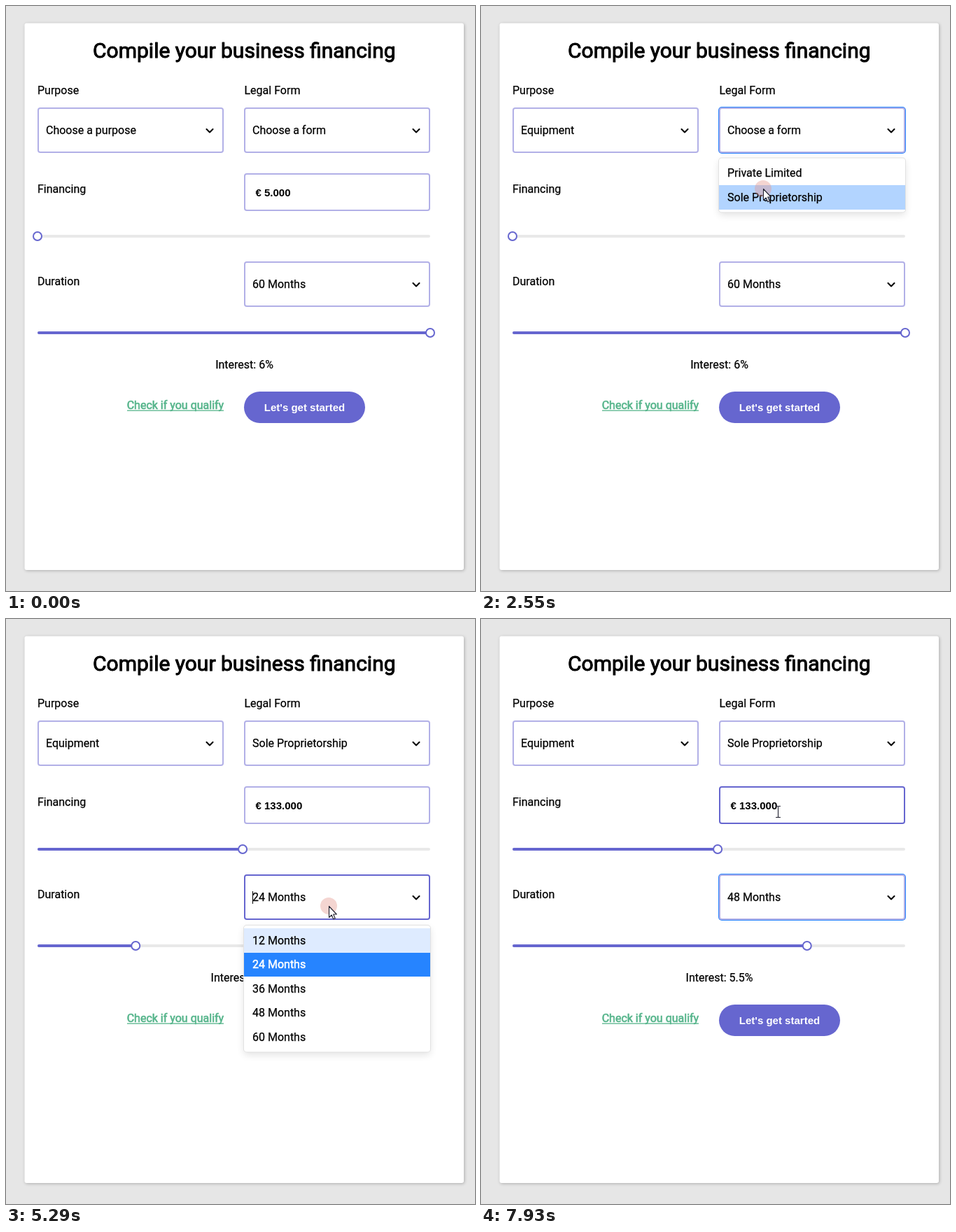
Recreate the animation shown at these times as an HTML page with a canvas. Size 670 by 836 pixels, loop 7.99 s.

```html
<!DOCTYPE html>
<html lang="en">
<head>
<meta charset="utf-8">
<title>Business financing form</title>
<style>
html, body { margin: 0; width: 100%; height: 100%; overflow: hidden; background: #e6e6e6; }
canvas { display: block; }
</style>
</head>
<body>
<canvas id="stage" width="670" height="836"></canvas>
<script>
const ctx = document.getElementById('stage').getContext('2d');
const LOOP = 7990;
const SANS = 'Roboto, sans-serif';
const ARIAL = '"Liberation Sans", Arial, sans-serif';
const VIOLET = '#6666cf', LIGHT = '#b2b0e7', BLUE = '#2684ff';
const TRACK = { x: 45, w: 561 };
const ROW = 34.5;

const purpose = { x: 45, y: 145, w: 266, h: 65, options: ['Marketing', 'Equipment'], open: [1050, 1600], focus: [1050, 1890] };
const legal = { x: 340, y: 145, w: 266, h: 65, options: ['Private Limited', 'Sole Proprietorship'], open: [1890, 2680], focus: [1890, 3400] };
const duration = { x: 340, y: 365, w: 266, h: 65, options: [12, 24, 36, 48, 60].map(m => m + ' Months'), open: [5220, 6140], focus: [5345, LOOP] };
const selects = [purpose, legal, duration];
const amount = { x: 340, y: 239, w: 266, h: 54 };
const button = { x: 340, y: 551, w: 173, h: 45 };

// Pointer path: time, x, y
const path = [
  [260, 562, 775], [620, 330, 440], [950, 160, 185], [1130, 158, 187], [1320, 160, 221],
  [1480, 165, 268], [1610, 165, 270], [1830, 395, 190], [1960, 398, 190], [2280, 404, 236],
  [2500, 403, 261], [2690, 403, 261], [2950, 190, 310], [3200, 9, 337], [3370, 45, 333],
  [3460, 98, 333], [3660, 338, 333], [3860, 338, 333], [4060, 614, 464], [4130, 624, 466],
  [4300, 606, 466], [4500, 606, 466], [4780, 185, 467], [4860, 185, 467], [5150, 461, 407],
  [5220, 461, 410], [5350, 461, 410], [5780, 440, 590], [5980, 435, 566], [6140, 435, 566],
  [6400, 412, 598], [6600, 412, 598], [6670, 393, 593], [6690, 393, 593], [6870, 420, 748],
  [7110, 420, 748], [7330, 333, 560], [7460, 352, 430], [7650, 429, 273], [7780, 429, 273], [7920, 424, 275]
];
const presses = [[1010, 1130], [1540, 1640], [1850, 1960], [2500, 2690], [3380, 3860], [4490, 4860], [5200, 5350], [6030, 6150]];

const within = (t, [a, b]) => t >= a && t < b;
const inside = (p, r) => p.x >= r.x && p.x < r.x + r.w && p.y >= r.y && p.y < r.y + r.h;

function pointerAt(t) {
  const i = path.findIndex(k => k[0] > t);
  if (i < 0) return { x: path.at(-1)[1], y: path.at(-1)[2] };
  if (i === 0) return { x: -99, y: -99 };
  const [t0, x0, y0] = path[i - 1], [t1, x1, y1] = path[i];
  const u = (t - t0) / (t1 - t0), e = u * u * (3 - 2 * u);
  return { x: x0 + (x1 - x0) * e, y: y0 + (y1 - y0) * e };
}

const trackShare = t => Math.min(1, Math.max(0, (pointerAt(t).x - TRACK.x) / TRACK.w));

function stateAt(t) {
  const thousands = t < 3370 ? 5 : 5 + Math.round(245 * trackShare(Math.min(t, 3660)));
  let months = 60;
  if (t >= 6140) months = 48;
  else if (t >= 4500) months = 12 + 12 * Math.round(4 * trackShare(Math.min(t, 4780)));
  const rate = (thousands < 100 ? 6 : 5) + (60 - months) / 24;
  return { thousands, months, rate };
}

function text(str, x, y, { size = 16, color = '#000', family = SANS, weight = 400, extra = 0.25, align = 'left' } = {}) {
  ctx.font = `${weight} ${size}px ${family}`;
  ctx.textAlign = align;
  ctx.fillStyle = ctx.strokeStyle = color;
  ctx.fillText(str, x, y);
  if (extra) {
    ctx.lineWidth = extra;
    ctx.lineJoin = 'round';
    ctx.strokeText(str, x, y);
  }
}

function rounded(x, y, w, h, r) {
  ctx.beginPath();
  ctx.roundRect(x, y, w, h, r);
}

function fillBox(x, y, w, h, r, color) {
  rounded(x, y, w, h, r);
  ctx.fillStyle = color;
  ctx.fill();
}

function shadowed(color, dx, dy, blur, draw) {
  ctx.save();
  ctx.shadowColor = color;
  ctx.shadowOffsetX = dx;
  ctx.shadowOffsetY = dy;
  ctx.shadowBlur = blur;
  draw();
  ctx.restore();
}

function field({ x, y, w, h }, border, ring) {
  if (ring) fillBox(x - 1, y - 1, w + 2, h + 2, 5, BLUE);
  fillBox(x, y, w, h, 4, border);
  fillBox(x + 2, y + 2, w - 4, h - 4, 2, '#fff');
}

function drawSelect(s, value, t, hover) {
  field(s, hover ? VIOLET : LIGHT, within(t, s.focus));
  text(value, s.x + 12, s.y + 38);
  const cx = s.x + s.w - 20, cy = s.y + 33;
  ctx.beginPath();
  ctx.moveTo(cx - 4.5, cy - 2);
  ctx.lineTo(cx, cy + 2.4);
  ctx.lineTo(cx + 4.5, cy - 2);
  ctx.strokeStyle = '#000';
  ctx.lineWidth = 2.1;
  ctx.lineCap = ctx.lineJoin = 'round';
  ctx.stroke();
  if (within(t, s.open) && (t - s.open[0]) % 1000 < 500) {
    ctx.fillStyle = '#000';
    ctx.fillRect(s.x + 12, s.y + 24, 1, 18);
  }
}

function drawMenu(s, value, p, pressed) {
  const top = s.y + s.h + (s === duration ? 8 : 7.5), height = 8 + ROW * s.options.length;
  shadowed('rgba(0,0,0,.12)', 0, 4, 11, () => fillBox(s.x, top, s.w, height, 4, '#fff'));
  fillBox(s.x - 1, top - 1, s.w + 2, height + 2, 5, '#e2e2e2');
  fillBox(s.x, top, s.w, height, 4, '#fff');
  const under = Math.floor((p.y - top - 4) / ROW);
  const hovered = under >= 0 && under < s.options.length;
  const current = hovered ? under : 0;
  s.options.forEach((label, i) => {
    const y = top + 4 + i * ROW, chosen = label === value;
    if (chosen || i === current) {
      ctx.fillStyle = chosen ? BLUE : pressed && hovered ? '#b2d4ff' : '#deebff';
      ctx.fillRect(s.x, Math.round(y), s.w, Math.round(y + ROW) - Math.round(y));
    }
    text(label, s.x + 12, Math.round(y + 22.8), { color: chosen ? '#fff' : '#000', extra: chosen ? 0.5 : 0.25 });
  });
}

function drawSlider(y, share) {
  const x = TRACK.x + TRACK.w * share;
  fillBox(TRACK.x, y - 2, TRACK.w, 4, 2, '#e9e9e9');
  fillBox(TRACK.x, y - 2, TRACK.w * share, 4, 2, VIOLET);
  ctx.beginPath();
  ctx.arc(x, y, 6, 0, 7);
  ctx.fillStyle = '#fff';
  ctx.fill();
  ctx.strokeStyle = VIOLET;
  ctx.lineWidth = 2;
  ctx.stroke();
  return { x: x - 8, y: y - 8, w: 16, h: 16 };
}

const shapes = {
  arrow: new Path2D('M.5.5V16.5L4.2 13L6.7 18.8L9.2 17.7L6.7 12H11.3Z'),
  hand: new Path2D('M-1.5 1.5Q0-.8 1.5 1.5V8Q3 6.3 4.5 8.3Q6.3 7 7.5 9Q9.5 8 10.5 10.3V15Q10.5 18 8.5 20V22.5H0V20.5Q-3 17-5.5 13Q-6-.2-5.5 11.2Q-3.5 10.3-1.5 13Z'.replace('Q-6-.2-5.5 11.2', 'Q-6.2 11.6-5 11')),
  beam: new Path2D('M-3-8H-1Q0-8 0-7Q0-8 1-8H3M0-7V7M-3 8H-1Q0 8 0 7Q0 8 1 8H3')
};

function drawPointer(p, kind, pressed) {
  if (pressed) {
    ctx.beginPath();
    ctx.arc(p.x, p.y, 12, 0, 7);
    ctx.fillStyle = 'rgba(228,150,140,.4)';
    ctx.fill();
  }
  ctx.save();
  ctx.translate(Math.round(p.x), Math.round(p.y));
  ctx.lineWidth = 1.1;
  ctx.lineCap = ctx.lineJoin = 'round';
  ctx.strokeStyle = '#222230';
  if (kind === 'beam') {
    ctx.translate(0.5, 0.5);
  } else {
    ctx.fillStyle = '#fff';
    ctx.fill(shapes[kind]);
  }
  ctx.stroke(shapes[kind]);
  if (kind === 'hand') {
    ctx.beginPath();
    for (const x of [1.5, 4.5, 7.5]) {
      ctx.moveTo(x, 8.5);
      ctx.lineTo(x, 12);
    }
    ctx.stroke();
  }
  ctx.restore();
}

function drawButton(hover) {
  const paint = () => fillBox(button.x, button.y, button.w, button.h, 22.5, hover ? '#5152ca' : VIOLET);
  if (hover) shadowed('#6d6de0', 2, 2, 5, paint);
  else paint();
  text("Let's get started", 426.5, 579, { size: 15, weight: 700, family: ARIAL, color: '#fff', extra: 0, align: 'center' });
}

function draw(t) {
  const p = pointerAt(t), { thousands, months, rate } = stateAt(t);
  const pressed = presses.some(span => within(t, span));
  const opened = selects.find(s => within(t, s.open));
  const values = new Map([
    [purpose, t < 1600 ? 'Choose a purpose' : 'Equipment'],
    [legal, t < 2680 ? 'Choose a form' : 'Sole Proprietorship'],
    [duration, months + ' Months']
  ]);
  const onAmount = !opened && inside(p, amount);
  const onButton = !opened && inside(p, button);

  ctx.fillStyle = '#e6e6e6';
  ctx.fillRect(0, 0, 670, 836);
  shadowed('rgba(0,0,0,.25)', 1, 1, 4, () => fillBox(26.5, 24.5, 627.5, 781.5, 3, '#fff'));

  text('Compile your business financing', 340.3, 74, { size: 30, extra: 1, align: 'center' });
  text('Purpose', 45, 126);
  text('Legal Form', 340.5, 126);
  text('Financing', 45, 267);
  text('Duration', 45, 399);

  for (const s of selects) drawSelect(s, values.get(s), t, inside(p, s));
  field(amount, onAmount ? VIOLET : LIGHT);
  text(`€ ${thousands}.000`, 356.5, 272, { size: 15, weight: 700, family: ARIAL, extra: 0 });

  const thumbs = [drawSlider(329, (thousands - 5) / 245), drawSlider(467, (months - 12) / 48)];
  text(`Interest: ${rate}%`, 340.5, 518, { align: 'center' });
  text('Check if you qualify', 172.7, 576, { color: '#57b58c', extra: 0.65 });
  ctx.fillRect(173, 577.5, 138, 1.3);
  drawButton(onButton);

  if (opened) drawMenu(opened, values.get(opened), p, pressed);

  const dragging = within(t, [3380, 3860]) || within(t, [4490, 4860]);
  const onThumb = !opened && thumbs.some(r => inside(p, r));
  const kind = onAmount ? 'beam' : onButton || onThumb || dragging ? 'hand' : 'arrow';
  if (t >= path[0][0]) drawPointer(p, kind, pressed);
}

const start = performance.now();
function tick() {
  draw((performance.now() - start) % LOOP);
  requestAnimationFrame(tick);
}
tick();
</script>
</body>
</html>
```
